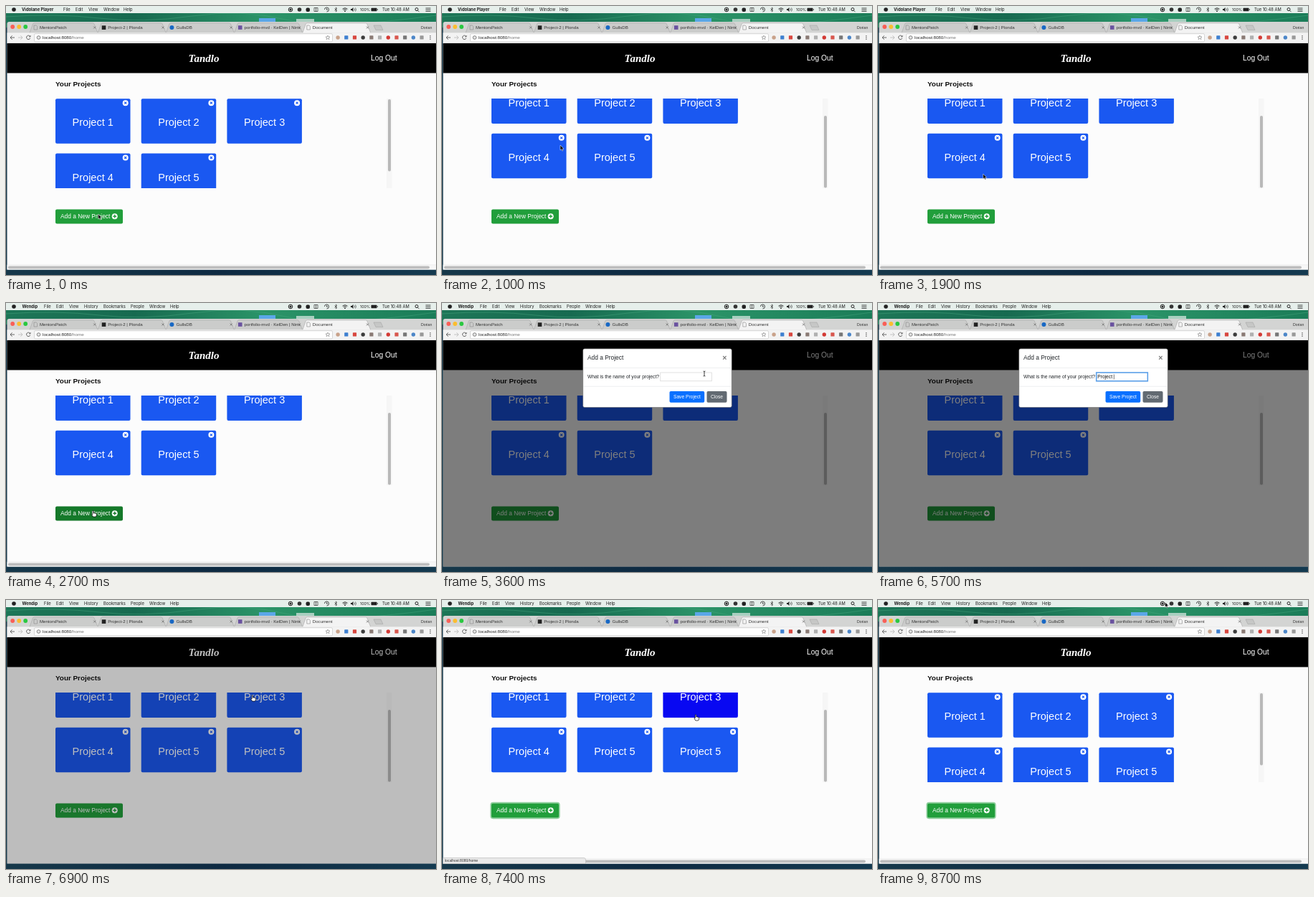
Animation, 600 px wide and 375 px high, one loop 8800 ms. Source, as an HTML page:

```html
<!DOCTYPE html>
<html lang="en">
<head>
<meta charset="utf-8">
<title>Project board</title>
<style>
html, body { margin: 0; width: 100%; height: 100%; overflow: hidden; background: #fcfcfc; }
svg { display: block; width: 100%; height: 100%; }
text { font-family: "Liberation Sans", Arial, sans-serif; white-space: pre; }
.menu text { font-family: Inter, sans-serif; font-size: 5.8px; fill: #1c1c1c; }
.menu .app { font-weight: 700; }
.logo { font: italic 700 15px "Liberation Serif", serif; }
</style>
</head>
<body>
<svg id="stage" viewBox="0 0 600 375" preserveAspectRatio="none">
  <defs>
    <linearGradient id="sea"><stop offset="0" stop-color="#1d7657"/><stop offset=".3" stop-color="#176a50"/><stop offset=".6" stop-color="#2b9468"/><stop offset="1" stop-color="#1b7c58"/></linearGradient>
    <linearGradient id="deep"><stop offset="0" stop-color="#16384a"/><stop offset=".5" stop-color="#0e2a42"/><stop offset="1" stop-color="#143a50"/></linearGradient>
    <clipPath id="listClip"><rect x="60" y="129" width="480" height="125"/></clipPath>
    <clipPath id="tabClip"><rect x="320" y="22" width="90.5" height="15"/></clipPath>
  </defs>
  <rect width="600" height="375" fill="url(#deep)"/>
  <rect width="600" height="30" fill="url(#sea)"/>
  <path d="M0 15Q70 10 130 17T260 14T390 19T600 13" fill="none" stroke="#4aa982" opacity=".45"/>
  <rect x="353" y="17" width="23" height="5" fill="#5ba7e8"/>
  <rect x="405" y="18" width="25" height="4" fill="#a9cfc0"/>
  <rect width="600" height="10" fill="#e6efeb"/>
  <g class="menu" id="menuA"></g>
  <g class="menu" id="menuB"></g>
  <g class="menu" id="status"></g>
  <g id="frame"></g>
  <rect x="1.5" y="52" width="598.5" height="315.5" fill="#fcfcfc"/>
  <rect x="1.5" y="52" width="598.5" height="41.5" fill="#000"/>
  <text class="logo" x="276" y="78" text-anchor="middle" fill="#fff">Tandlo</text>
  <text x="509" y="76" font-size="10.3" fill="#fff">Log Out</text>
  <text x="69" y="112" font-size="9.9" font-weight="700" fill="#111">Your Projects</text>
  <g clip-path="url(#listClip)"><g id="cards"></g></g>
  <rect x="531" y="129" width="7.5" height="125" fill="#f6f6f6"/>
  <rect id="thumb" x="533" y="130" width="4" height="100.5" rx="2" fill="#b9b9b9"/>
  <rect id="ring" x="68.2" y="282.7" width="95.6" height="21.6" rx="3" fill="none" stroke="#8fcf9d" stroke-width="1.7"/>
  <rect id="add" x="69" y="283.5" width="94" height="20" rx="2"/>
  <text x="76" y="296.3" font-size="8.4" fill="#fff">Add a New Project</text>
  <circle cx="151.7" cy="293.2" r="4" fill="#fff"/>
  <path id="plus" d="M149.3 293.2h4.8M151.7 290.8v4.8" stroke-width="1.4"/>
  <g id="hbar">
    <rect x="1.5" y="361" width="598.5" height="6.5" fill="#f7f7f7"/>
    <path d="M1.5 360.8H600" stroke="#e4e4e4" stroke-width=".6"/>
    <rect x="3" y="362.4" width="588" height="3.8" rx="1.9" fill="#bdbdbd"/>
  </g>
  <g id="link">
    <path d="M1.5 359.5H198q2.5 0 2.5 2.5V367.5H1.5Z" fill="#e9e9e9" stroke="#b5b5b5" stroke-width=".6"/>
    <text x="4" y="365.3" font-size="5" fill="#333">localhost:8080/home</text>
  </g>
  <rect id="shade" x="1.5" y="52" width="598.5" height="315.5"/>
  <g id="modal">
    <rect x="196.7" y="63.8" width="207.6" height="81.7" rx="2.3" fill="#fff" stroke="#555" stroke-width=".5"/>
    <path d="M197 90.5H404M197 116.3H404" stroke="#e6e8ea" stroke-width=".7"/>
    <text x="203" y="79.3" font-size="8.4" fill="#212529">Add a Project</text>
    <text x="394.3" y="79.7" font-size="10.5" font-weight="700" text-anchor="middle" fill="#777">×</text>
    <text x="203" y="105.2" font-size="6.7" fill="#212529">What is the name of your project?</text>
    <rect id="field" x="304.7" y="97" width="71.6" height="11.8" fill="#fff"/>
    <text id="typed" x="306.2" y="105.2" font-size="6.7" fill="#111"></text>
    <path id="caret" d="M0 99.5v7" stroke="#111" stroke-width=".6"/>
    <rect id="save" x="317.5" y="123" width="48.7" height="15.7" rx="1.8"/>
    <text x="341.9" y="133.2" font-size="6.7" text-anchor="middle" fill="#fff">Save Project</text>
    <rect x="369.5" y="123" width="28" height="15.7" rx="1.8" fill="#626a72"/>
    <text x="383.5" y="133.2" font-size="6.7" text-anchor="middle" fill="#fff">Close</text>
  </g>
  <g id="cursor">
    <path id="arrow" d="M0 0V7L1.6 5.6L2.7 8L3.9 7.5L2.8 5.1H5Z" fill="#000" stroke="#fff" stroke-width=".5"/>
    <path id="hand" d="M0 0q1-.8 1.5 .3V3q2.5-.3 3.8 1V6q-.3 1-1 2H.5L-1.5 5q0-1 1.5-.3Z" fill="#fff" stroke="#000" stroke-width=".7"/>
    <path id="beam" d="M-1.4-3.5Q0-3.5 0-2.5Q0-3.5 1.4-3.5M0-2.5V2.5M-1.4 3.5Q0 3.5 0 2.5Q0 3.5 1.4 3.5" fill="none" stroke="#111" stroke-width=".8"/>
  </g>
</svg>
<script>
const LOOP = 8800, STEP = 100;
const $ = id => document.getElementById(id);
const set = (id, attrs) => { for (const k in attrs) $(id).setAttribute(k, attrs[k]); };
const show = (id, on) => set(id, { visibility: on ? 'visible' : 'hidden' });

function el(parent, tag, attrs, text) {
  const n = document.createElementNS('http://www.w3.org/2000/svg', tag);
  for (const k in attrs) n.setAttribute(k, attrs[k]);
  if (text) n.textContent = text;
  parent.appendChild(n);
  return n;
}
const line = (g, d, stroke, w = .8) =>
  el(g, 'path', { d, stroke, 'stroke-width': w, fill: 'none' });
const dot = (g, cx, cy, r, fill) => el(g, 'circle', { cx, cy, r, fill });
const hoop = (g, cx, cy, r, stroke) => el(g, 'circle', { cx, cy, r, stroke, fill: 'none' });
const box = (g, x, y, width, height, fill, rx = 0) =>
  el(g, 'rect', { x, y, width, height, fill, rx });
const label = (g, x, y, size, text, fill = '#222') =>
  el(g, 'text', { x, y, 'font-size': size, fill }, text);

function buildMenus() {
  const menu = (id, items) => items.forEach(([x, s], i) =>
    el($(id), 'text', { x, y: 7.2, class: i ? '' : 'app' }, s));
  menu('menuA', [[22, 'Vidolane Player'], [80, 'File'], [97, 'Edit'], [115, 'View'], [136, 'Window'], [164, 'Help']]);
  menu('menuB', [[22.5, 'Wendip'], [53, 'File'], [70, 'Edit'], [88, 'View'], [109, 'History'],
    [136, 'Bookmarks'], [174, 'People'], [200, 'Window'], [229, 'Help']]);

  const g = $('status'), ink = '#222';
  dot(g, 11, 5, 2.8, ink);
  hoop(g, 397, 5, 2.8, ink);
  dot(g, 397, 5, 1.5, ink);
  dot(g, 409.5, 5, 2.8, '#333');
  box(g, 418.5, 2.5, 5.5, 5.5, ink, 2);
  line(g, 'M430 2.5h5v5h-5zM432.5 2.5v5', '#444');
  line(g, 'M444.5 5a3 3 0 1 1 3 3M447.5 3.2V5.2H449', ink);
  line(g, 'M458.5 3.5L462 6.5L460.3 8V2L462 3.5L458.5 6.5', ink, .6);
  line(g, 'M469.5 4.2Q473 1.2 476.5 4.2M470.7 5.6Q473 3.6 475.3 5.6', ink, .9);
  dot(g, 473, 7.2, .9, ink);
  el(g, 'path', { d: 'M481 4h1.5l2-2v6l-2-2H481z', fill: ink });
  line(g, 'M486 3.5q1.3 1.5 0 3M487.5 2.5q2 2.5 0 5', ink, .6);
  el(g, 'text', { x: 494, y: 7.1 }, '100%').style.fontSize = '5.3px';
  box(g, 509.5, 2.8, 8, 4.4, ink, .8);
  box(g, 518, 4.2, .8, 1.6, ink);
  el(g, 'text', { x: 525, y: 7.2 }, 'Tue 10:48 AM');
  hoop(g, 573, 4.6, 2, ink);
  line(g, 'M574.5 6.2l2 2', ink);
  line(g, 'M585.5 3h7M585.5 5.2h7M585.5 7.4h7', ink);
}

function buildBrowser() {
  const g = $('frame');
  el(g, 'path', { d: 'M1.5 52V25q0-3 3-3H600V52Z', fill: '#d3d4d3' });
  ['#f95f57', '#fbbd2e', '#2ac840'].forEach((c, i) => dot(g, 9.2 + 9 * i, 29, 2.9, c));
  const tabs = ['MentorsPatch', 'Project-2 | Plonda', 'GullsDB', 'portfolio-mvd · KelDen | Nimora', 'Document'];
  tabs.forEach((name, i) => {
    const x = 33 + 95.2 * i, on = i === 4;
    el(g, 'path', { d: `M${x} 37.5L${x + 4.5} 25q.6-1.2 2-1.2H${x + 88}q1.4 0 2 1.2L${x + 95} 37.5`,
      fill: on ? '#f3f3f3' : '#cbcccb', stroke: '#a6a6a6', 'stroke-width': .6 });
    if (i === 1) box(g, x + 5.5, 27.3, 5.6, 5.6, '#222');
    else if (i === 2) dot(g, x + 8, 30, 3, '#1868c4');
    else if (i === 3) box(g, x + 5.3, 27.2, 5.6, 5.6, '#69529f');
    else line(g, `M${x + 6} 27h3.2l1.4 1.4V33h-4.6z`, '#888', .6);
    const t = label(g, x + 14, 32.2, 6.1, name, '#333');
    if (i === 3) t.setAttribute('clip-path', 'url(#tabClip)');
    line(g, `M${x + 89.2} 28.5l3 3m0-3l-3 3`, '#666', .7);
  });
  el(g, 'path', { d: 'M513 27h10l3 6.5h-10z', fill: '#c6c7c6', stroke: '#a6a6a6', 'stroke-width': .6 });
  label(g, 579, 31.5, 5.2, 'Dorian', '#333');

  box(g, 1.5, 37.3, 598.5, 14.7, '#f3f3f3');
  line(g, 'M1.5 51.7H600', '#bcbcbc', .6);
  box(g, 39.5, 38.7, 416, 11.2, '#fff', 1.5).setAttribute('stroke', '#d5d5d5');
  line(g, 'M12 44H6M8.6 41.3L6 44l2.6 2.7', '#555', .9);
  line(g, 'M17 44h6M20.4 41.3L23 44l-2.6 2.7', '#bbb', .9);
  line(g, 'M33.5 42.3a2.7 2.7 0 1 0 .3 2.5M34 41v1.9h-1.9', '#555', .9);
  hoop(g, 45.5, 44, 2.3, '#777');
  line(g, 'M45.5 43.7v1.5M45.5 42.5v.6', '#777', .6);
  const url = label(g, 51, 46.3, 6.25, 'localhost:8080', '#222');
  el(url, 'tspan', { fill: '#777' }, '/home');
  line(g, 'M449 41l.9 2h2.1l-1.6 1.4l.6 2.2l-2-1.3l-2 1.3l.6-2.2l-1.6-1.4h2.1z', '#777', .6);
  ['#c9a28a', '#3d7fd0', '#d8473f', '#3c3c3c', '#8a7a74', '#b0b0b0', '#d33a35', '#d8574e', '#777', '#4c86c8', '#999']
    .forEach((c, i) => i % 3 ? box(g, 460.5 + 11.7 * i, 41.3, 5.2, 5.2, c, .6) : dot(g, 463.1 + 11.7 * i, 44, 2.7, c));
  for (const y of [41.7, 44, 46.3]) dot(g, 592, y, .75, '#555');
}

const cards = [];
function buildCards() {
  [1, 2, 3, 4, 5, 5].forEach((n, i) => {
    const x = 69 + 119.7 * (i % 3), y = 129.2 + 76.3 * Math.floor(i / 3);
    const g = el($('cards'), 'g', {});
    const face = box(g, x, y, 104.5, 62.5, '#1a58f1', 2);
    label(g, x + 52.2, y + 38.2, 14.5, 'Project ' + n, '#fff').setAttribute('text-anchor', 'middle');
    dot(g, x + 97.7, y + 6, 4, '#fff');
    const cross = line(g, `M${x + 96.2} ${y + 4.5}l3 3m0-3l-3 3`, '#1a58f1', 1.1);
    cards.push({ g, face, cross, x, y });
  });
}

const ramp = (t, a, b) => Math.min(1, Math.max(0, (t - a) / (b - a)));
const ease = p => p * p * (3 - 2 * p);

// time, x, y
const trail = [
  [0, 128.5, 290], [200, 128.5, 290], [600, 165, 194], [1500, 165, 194], [2400, 121, 290],
  [2800, 121, 290], [3500, 366, 98.5], [3700, 366, 98.5], [4000, 348, 102], [6100, 348, 102],
  [6500, 342, 130], [6800, 342, 130], [7300, 353.3, 160], [8000, 353.3, 160], [8600, 400.5, 3], [LOOP, 400.5, 3]
];
function pointer(t) {
  let i = 1;
  while (t > trail[i][0]) i++;
  const [t0, x0, y0] = trail[i - 1], [t1, x1, y1] = trail[i];
  const p = ease(ramp(t, t0, t1));
  return { x: x0 + (x1 - x0) * p, y: y0 + (y1 - y0) * p };
}
const inside = (p, x, y, w, h) => p.x >= x && p.x <= x + w && p.y >= y && p.y <= y + h;

function draw(t) {
  const m = pointer(t), active = t >= 2500;
  show('menuA', !active);
  show('menuB', active);

  const scroll = 27.7 * (ease(ramp(t, 600, 950)) - ease(ramp(t, 7600, 8000)));
  set('cards', { transform: `translate(0 ${-scroll})` });
  set('thumb', { y: 130 + 23 * scroll / 27.7 });

  const open = t >= 2800 && t < 7000, free = active && !open;
  const inList = inside(m, 60, 129, 480, 125);
  let overCard = false;
  cards.forEach((c, i) => {
    const shown = i < 5 || t >= 6700;
    const hot = free && shown && inList && inside(m, c.x, c.y - scroll, 104.5, 62.5);
    const color = hot ? '#0808f2' : '#1a58f1';
    c.g.setAttribute('visibility', shown ? 'visible' : 'hidden');
    c.face.setAttribute('fill', color);
    c.cross.setAttribute('stroke', color);
    overCard = overCard || hot;
  });
  show('link', overCard);
  show('hbar', !open);

  const overAdd = free && inside(m, 69, 283.5, 94, 20);
  const green = overAdd ? '#15792a' : '#219e3b';
  set('add', { fill: green });
  set('plus', { stroke: green });
  show('ring', t >= 7000);

  const slide = 1 - (1 - ramp(t, 2900, 3200)) ** 2;
  const leave = ramp(t, 6700, 6900);
  set('shade', { opacity: .5 * (ramp(t, 2750, 2950) - ramp(t, 6800, 7000)) });
  set('modal', {
    opacity: ramp(t, 2850, 3050) - leave,
    transform: `translate(0 ${-20 * (1 - slide + leave)})`
  });
  show('modal', open);

  const focus = t >= 4000 && t < 6600;
  set('field', focus ? { stroke: '#5a9fe8', 'stroke-width': 1.6 } : { stroke: '#d4d4d4', 'stroke-width': .7 });
  const count = t < 4700 ? 0 : t < 6000 ? Math.min(8, 1 + Math.floor((t - 4700) / 120)) : 9;
  $('typed').textContent = 'Project 5'.slice(0, count);
  set('caret', { transform: `translate(${306.6 + (count ? $('typed').getComputedTextLength() : 0)} 0)` });
  show('caret', focus && (t - 4000) % 1000 < 800);
  const overSave = open && inside(m, 317.5, 123, 48.7, 15.7);
  set('save', { fill: overSave ? '#0062cc' : '#0a70ff' });

  const overField = open && t >= 3100 && inside(m, 304.7, 97, 71.6, 11.8);
  const kind = overField ? 'beam' : overAdd || overCard || overSave ? 'hand' : 'arrow';
  const typing = t >= 4700 && t < 6100;
  for (const k of ['arrow', 'hand', 'beam']) show(k, k === kind && !typing);
  set('cursor', { transform: `translate(${m.x} ${m.y})` });
}

buildMenus();
buildBrowser();
buildCards();
const start = performance.now();
function tick() {
  const t = (performance.now() - start) % LOOP;
  draw(Math.floor(t / STEP) * STEP);
  requestAnimationFrame(tick);
}
draw(0);
requestAnimationFrame(tick);
</script>
</body>
</html>
```
